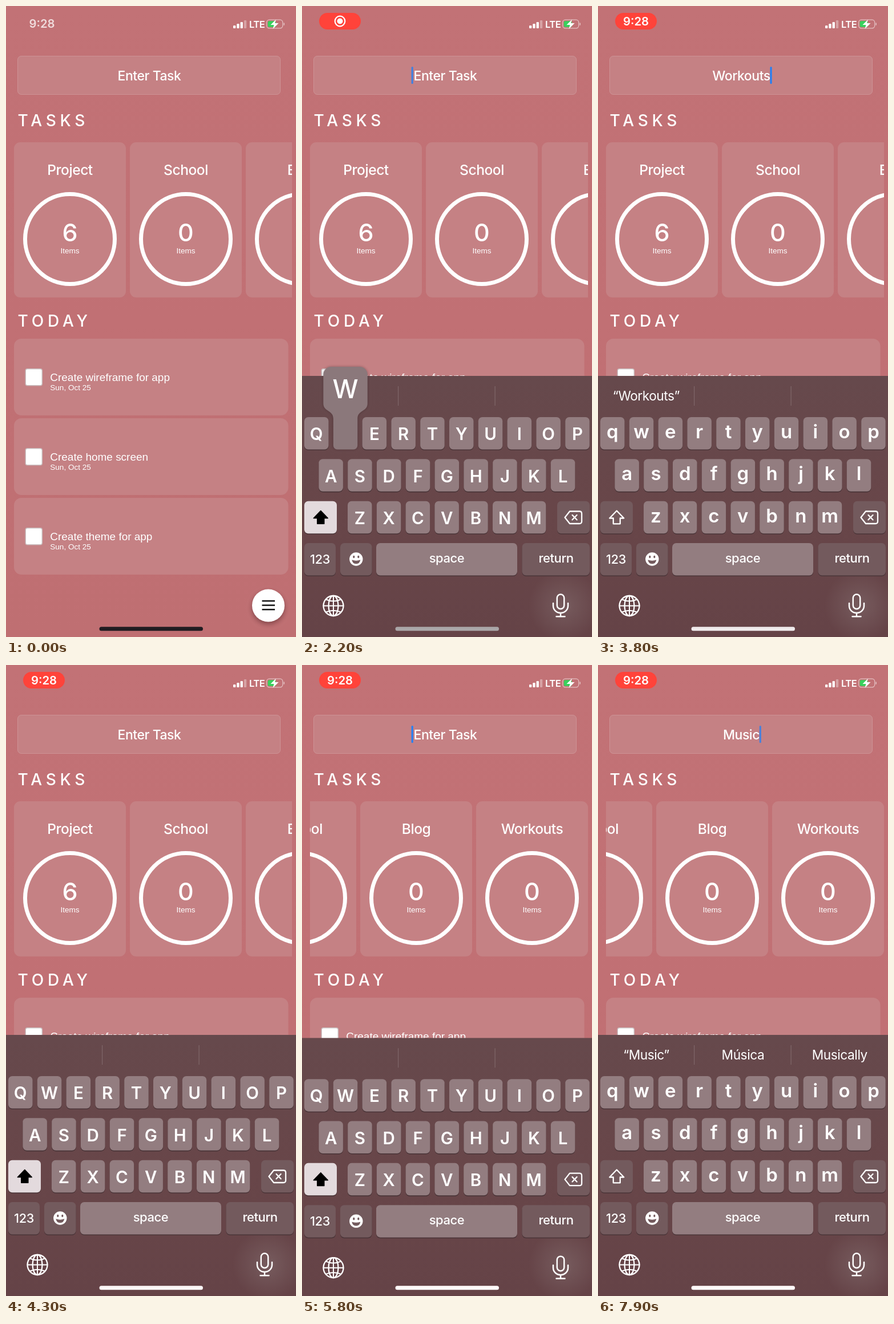
Write an HTML page with a canvas that moves like this. It is 508 by 1102 pixels and loops after 8 s.

```html
<!DOCTYPE html>
<html lang="en">
<head>
<meta charset="utf-8">
<title>Task list</title>
<style>
  html, body { margin: 0; width: 100%; height: 100%; overflow: hidden; background: #c17074; }
  canvas { display: block; width: 508px; height: 1102px; }
</style>
</head>
<body>
<canvas id="stage"></canvas>
<script>
const W = 508, H = 1102, LOOP = 8000, TAU = Math.PI * 2;
const canvas = document.getElementById('stage');
const c = canvas.getContext('2d');
const dpr = window.devicePixelRatio || 1;
canvas.width = W * dpr;
canvas.height = H * dpr;

const WHITE = '#fff', CARD = '#c58184';
const KEY = '#937d80', KEY_DARK = '#735a5d', KEY_SHADE = '#4a3538';
const KB_TOP = 646, KB_H = H - KB_TOP;
const ROWS = [
  { keys: 'qwertyuiop', x: 4, y: 72 },
  { keys: 'asdfghjkl', x: 29.4, y: 145.3 },
  { keys: 'zxcvbnm', x: 80, y: 218.7 }
];
const PITCH = 50.8, KEY_W = 42.5, KEY_H = 56.5;
const COMMIT = 130;

// Each session: keyboard opens, letters go down at the listed times, return submits.
const sessions = [
  { open: 1225, word: 'Workouts', at: [2150, 2420, 2640, 2860, 3080, 3260, 3420, 3580], submit: 4300, hints: [] },
  { open: 5440, word: 'Music', at: [6550, 6790, 7000, 7190, 7350], submit: Infinity, hints: ['Música', 'Musically'] }
];

const clamp = (v, a = 0, b = 1) => Math.min(b, Math.max(a, v));
const ramp = (t, a, b) => clamp((t - a) / (b - a));
const mix = (a, b, p) => `rgb(${a.map((v, i) => Math.round(v + (b[i] - v) * p))})`;
const spring = ms => {
  if (ms <= 0) return 0;
  const k = 18 * ms / 1000;
  return 1 - (1 + k) * Math.exp(-k);
};
function track(t, pts) {
  let [pt, pv] = pts[0];
  for (const [x, v] of pts) {
    if (t < x) return pv + (v - pv) * ramp(t, pt, x);
    pt = x; pv = v;
  }
  return pv;
}

function box(x, y, w, h, r, fill) {
  c.beginPath();
  c.roundRect(x, y, w, h, r);
  c.fillStyle = fill;
  c.fill();
}
function disc(x, y, r, fill) {
  c.beginPath();
  c.arc(x, y, r, 0, TAU);
  c.fillStyle = fill;
  c.fill();
}
function ring(x, y, r, width, color = WHITE) {
  c.beginPath();
  c.arc(x, y, r, 0, TAU);
  c.lineWidth = width;
  c.strokeStyle = color;
  c.stroke();
}
function line(path, width, color = WHITE) {
  c.lineWidth = width;
  c.strokeStyle = color;
  c.lineCap = c.lineJoin = 'round';
  c.stroke(new Path2D(path));
}
function text(s, x, y, size, { weight = 500, align = 'center', color = WHITE, gap = -0.02 * size, face = 'Inter' } = {}) {
  c.font = `${weight} ${size}px "${face}", sans-serif`;
  c.letterSpacing = gap + 'px';
  c.textAlign = align;
  c.fillStyle = color;
  c.fillText(s, x, y);
  return c.measureText(s).width;
}
const plain = (s, x, y, size, align = 'left') =>
  text(s, x, y, size, { weight: 400, align, gap: 0, face: 'Liberation Sans' });

function drawStatus(t) {
  const old = 0.75 * (1 - ramp(t, 50, 200));
  if (old) text('9:28', 63, 38.3, 20.3, { weight: 600, color: `rgba(255,255,255,${old})`, gap: 0 });

  const shown = ramp(t, 100, 350);
  if (shown) {
    const pulse = clamp((0.5 - 0.5 * Math.cos((t - 5100) / 1950 * TAU)) * 1.4);
    const clock = ramp(t, 2950, 3150);
    c.globalAlpha = shown;
    box(30, 12, 73, 29, 14.5, mix([221, 59, 54], [255, 67, 58], pulse));
    c.globalAlpha = shown * (1 - clock);
    ring(66.5, 26.5, 8.8, 2.2);
    disc(66.5, 26.5, 5, WHITE);
    c.globalAlpha = clock;
    text('9:28', 66.5, 33.6, 20.3, { weight: 600, gap: 0 });
    c.globalAlpha = 1;
  }

  for (let i = 0; i < 4; i++) {
    const h = 5 + i * 3;
    box(398 + i * 6.3, 39 - h, 4.3, h, 1.2, i < 3 ? WHITE : 'rgba(255,255,255,.35)');
  }
  text('LTE', 426, 37.8, 16.5, { weight: 600, align: 'left', gap: -0.5 });
  c.beginPath();
  c.roundRect(456.7, 24.2, 28, 14.6, 4.5);
  c.lineWidth = 1.3;
  c.strokeStyle = 'rgba(255,255,255,.55)';
  c.stroke();
  box(458.7, 26.2, 14, 10.6, 2.5, '#38d15c');
  box(486.3, 29.3, 1.6, 4.6, 1, 'rgba(255,255,255,.55)');
  c.fillStyle = WHITE;
  c.fill(new Path2D('M473 23.5L463.5 33H469.5L467.5 40L477.5 30H471Z'));
}

function drawField(t, session, typed) {
  box(20, 87, 461, 68, 7, CARD);
  c.beginPath();
  c.roundRect(20.5, 87.5, 460, 67, 6.5);
  c.lineWidth = 1;
  c.strokeStyle = '#cd9295';
  c.stroke();
  const w = text(typed || 'Enter Task', 251, 129.7, 23);
  if (!session || t > session.submit) return;
  // The caret stays lit after each letter, then blinks once a second.
  let last = session.open;
  for (const a of session.at) if (t >= a + COMMIT) last = a + COMMIT;
  const p = (t - last) % 1000;
  c.globalAlpha = p < 700 ? 1 - ramp(p, 380, 560) : ramp(p, 850, 1000);
  box(typed ? 251 + w / 2 - 0.3 : 251 - w / 2 - 4, 106, 3.2, 30, 1.5, '#2480f4');
  c.globalAlpha = 1;
}

function drawLists(t) {
  text('TASKS', 20.5, 209.5, 28, { align: 'left', gap: 6.8 });
  text('TODAY', 20.5, 559.5, 28, { align: 'left', gap: 6.8 });

  const names = ['Project', 'School', 'Blog'];
  if (t >= sessions[0].submit) names.push('Workouts');
  const p = ramp(t, 4600, 5000);
  const scroll = 318 * (1 - (1 - p) ** 3);
  c.save();
  c.beginPath();
  c.rect(14, 230, 487, 290);
  c.clip();
  names.forEach((name, i) => {
    const x = 14 + i * 203 - scroll, mid = x + 98;
    box(x, 238, 196, 271, 11, CARD);
    text(name, mid, 295, 24.6);
    ring(mid, 407, 78.5, 7);
    text(i ? '0' : '6', mid, 410.5, 43, { gap: 0 });
    plain('Items', mid, 431.5, 13.55, 'center');
  });
  c.restore();

  ['Create wireframe for app', 'Create home screen', 'Create theme for app'].forEach((name, i) => {
    const y = 581 + i * 139;
    box(14, y, 480.5, 134, 13, CARD);
    box(33.5, y + 52, 30.5, 30.5, 4, '#c9bebf');
    box(35, y + 53.5, 27.5, 27.5, 2.5, WHITE);
    plain(name, 77.3, y + 74, 18.97);
    plain('Sun, Oct 25', 77.3, y + 90, 13.55);
  });

  c.save();
  c.shadowColor = 'rgba(60,20,25,.45)';
  c.shadowBlur = 9 * dpr;
  c.shadowOffsetY = 4 * dpr;
  disc(459.5, 1047, 28.5, WHITE);
  c.restore();
  for (let i = -1; i < 2; i++) box(448.5, 1045.3 + i * 7.5, 22.5, 2.5, 0, '#111');
}

function keyBox(x, y, w, fill) {
  box(x, y + 1.6, w, KEY_H, 7, KEY_SHADE);
  box(x, y, w, KEY_H, 7, fill);
}

function drawBubble(x, y, ch) {
  const L = x - 38.7, R = x + 38.7, l = x - 21.2, r = x + 21.2;
  const top = y - 88, neck = y - 24, in_ = y + 3, end = y + KEY_H;
  c.save();
  c.shadowColor = 'rgba(40,20,25,.35)';
  c.shadowBlur = 5 * dpr;
  c.beginPath();
  c.moveTo(L, neck);
  c.arcTo(L, top, x, top, 14);
  c.arcTo(R, top, R, neck, 14);
  c.lineTo(R, neck);
  c.bezierCurveTo(R, y - 9, r, y - 13, r, in_);
  c.arcTo(r, end, x, end, 7);
  c.arcTo(l, end, l, in_, 7);
  c.lineTo(l, in_);
  c.bezierCurveTo(l, y - 13, L, y - 9, L, neck);
  c.fillStyle = '#8b787b';
  c.fill();
  c.restore();
  const upper = ch !== ch.toLowerCase();
  text(ch, x, y - (upper ? 33 : 36), upper ? 45 : 50, { gap: 0 });
}

function drawKeyboard(t, top, session, typed) {
  c.save();
  c.beginPath();
  c.rect(0, top, W, H - top);
  c.clip();
  const bg = c.createLinearGradient(0, top, 0, top + KB_H);
  bg.addColorStop(0, '#66494c');
  bg.addColorStop(0.5, '#684649');
  bg.addColorStop(1, '#654347');
  c.fillStyle = bg;
  c.fillRect(0, top, W, KB_H);
  const glow = c.createRadialGradient(459, 1047, 5, 459, 1047, 62);
  glow.addColorStop(0, 'rgba(150,135,135,.32)');
  glow.addColorStop(1, 'rgba(150,135,135,0)');
  c.fillStyle = glow;
  c.fillRect(390, 980, 118, 122);
  c.restore();

  c.save();
  c.translate(0, top);
  for (const x of [168, 337.5]) box(x, 18, 1.2, 34, 0, 'rgba(255,255,255,.17)');
  if (typed) {
    const hints = [`“${typed}”`, ...(typed === session.word ? session.hints : [])];
    hints.forEach((s, i) => text(s, 84.5 + i * 169.4, 43, 22.7, { weight: 400 }));
  }

  const upper = !typed;
  const held = session.at.findIndex(a => t >= a && t < a + COMMIT);
  const down = held < 0 ? '' : session.word[held];
  let bubble = null;
  for (const row of ROWS) {
    [...row.keys].forEach((k, i) => {
      const ch = upper ? k.toUpperCase() : k;
      const x = row.x + i * PITCH, mid = x + KEY_W / 2;
      if (ch === down) { bubble = [mid, row.y, ch]; return; }
      keyBox(x, row.y, KEY_W, KEY);
      text(ch, mid, row.y + (upper ? 40.3 : 36.8), upper ? 29.5 : 33, { weight: 600, gap: 0 });
    });
  }

  // Shift
  keyBox(4, 218.7, 57, upper ? '#e3dadd' : KEY_DARK);
  const arrow = 'M32.8 235.5L45.3 248.5H38.8V258.3H26.8V248.5H20.3Z';
  if (upper) {
    c.fillStyle = '#000';
    c.fill(new Path2D(arrow));
    line(arrow, 1.5, '#000');
  } else line(arrow, 2.3);

  // Delete
  keyBox(447, 218.7, 57, KEY_DARK);
  line('M469 236.5H486Q490 236.5 490 240.5V254Q490 258 486 258H469L460.5 247.2Z', 2.3);
  line('M473.5 243L481.5 251.3M481.5 243L473.5 251.3', 2.3);

  // Bottom row
  keyBox(4, 292, 55, KEY_DARK);
  text('123', 31.5, 328, 21.7, { gap: -0.3 });
  keyBox(67, 292, 55.5, KEY_DARK);
  disc(94.8, 320, 11.7, WHITE);
  for (const x of [90.8, 98.8]) {
    c.beginPath();
    c.ellipse(x, 316, 1.6, 2.3, 0, 0, TAU);
    c.fillStyle = KEY_DARK;
    c.fill();
  }
  c.fill(new Path2D('M87.3 321.3Q94.8 324 102.3 321.3Q101 328.3 94.8 328.3Q88.6 328.3 87.3 321.3Z'));
  keyBox(130, 292, 247, KEY);
  text('space', 253.5, 326, 22);
  const ret = t >= session.submit - 120 && t < session.submit;
  keyBox(385.5, 292, 118.5, ret ? KEY : KEY_DARK);
  text('return', 445, 326, 22);

  // Globe
  ring(55, 401.5, 17.5, 2.3);
  c.beginPath();
  c.ellipse(55, 401.5, 8.5, 17.5, 0, 0, TAU);
  c.stroke();
  line('M55 384V419M37.5 401.5H72.5M42 390.5Q55 396 68 390.5M42 412.5Q55 407 68 412.5', 2);

  // Microphone
  c.beginPath();
  c.roundRect(446.8, 381.5, 12.4, 25.5, 6.2);
  c.lineWidth = 2.5;
  c.stroke();
  line('M440 397V401.5A13 12.5 0 0 0 466 401.5V397M453 414V420M445.5 420.3H460.5', 2.5);

  if (bubble) drawBubble(...bubble);
  c.restore();
}

function render(t) {
  c.setTransform(dpr, 0, 0, dpr, 0, 0);
  const bg = c.createLinearGradient(0, 0, 0, H);
  bg.addColorStop(0, '#c27276');
  bg.addColorStop(0.5, '#c17074');
  bg.addColorStop(1, '#bf6f72');
  c.fillStyle = bg;
  c.fillRect(0, 0, W, H);

  const session = sessions.filter(s => t >= s.open).pop();
  let typed = '', top = H;
  if (session) {
    if (t < session.submit) {
      typed = session.word.slice(0, session.at.filter(a => t >= a + COMMIT).length);
    }
    const up = spring(t - session.open) * (1 - spring(t - session.submit - 30));
    top = H - KB_H * up;
  }

  drawStatus(t);
  drawField(t, session, typed);
  drawLists(t);
  if (top < H - 0.5) drawKeyboard(t, top, session, typed);

  const light = track(t, [[1700, 0], [2200, 0.62], [3000, 0.9], [3800, 0.93], [4400, 1], [4700, 1], [5100, 0.85], [5600, 1]]);
  box(163.5, 1084.3, 181.5, 7, 3.5, mix([32, 28, 33], [255, 250, 250], light));
}

const start = performance.now();
function tick() {
  render((performance.now() - start) % LOOP);
  requestAnimationFrame(tick);
}
tick();
</script>
</body>
</html>
```
